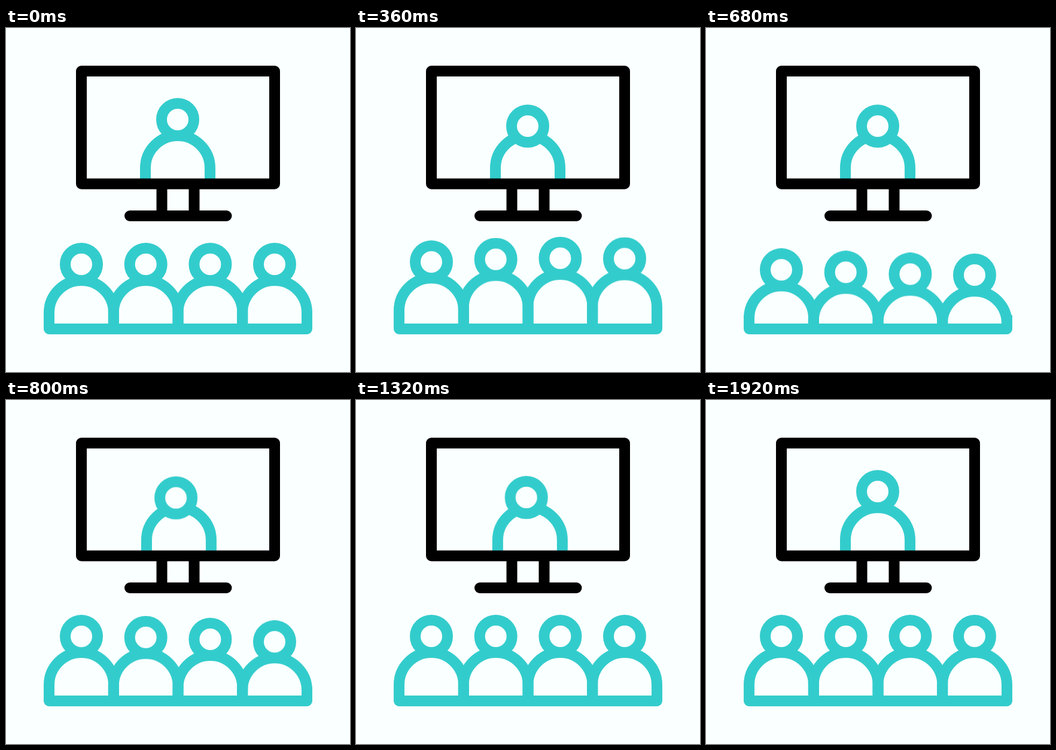
These frames come from a looping animation (575x575 px, 2 s). An HTML page:

```html
<!DOCTYPE html>
<html lang="en">
<head>
<meta charset="utf-8">
<title>Online lecture</title>
<style>
  html, body { margin: 0; width: 100%; height: 100%; overflow: hidden; background: #faffff; }
  svg { display: block; width: 100vw; height: 100vh; }
  .line { fill: none; stroke-width: 18; stroke-linejoin: round; }
  .teal { stroke: #33cccc; }
  .ink { stroke: #000; }
  .face { fill: #faffff; }

  .viewer, .head, .torso { animation: 2s cubic-bezier(.37, 0, .63, 1) infinite; }
  .viewer { animation-name: bounce; animation-delay: calc(var(--i) * 40ms); }
  .head { animation-name: nod; }
  .torso { animation-name: sway; }
  .voice {
    stroke-linecap: round;
    stroke-dasharray: 32 100;
    opacity: 0;
    animation: speak 2s linear infinite;
  }
  .left { animation-delay: -470ms; }

  @keyframes bounce {
    0%, 4% { transform: translateY(0); }
    13.75% { transform: translateY(-10.2px); }
    27.5% { transform: translateY(18px); }
    40.75%, 100% { transform: translateY(0); }
  }
  @keyframes nod {
    0%, 4% { transform: translate(0, 0); }
    14%, 36% { transform: translate(0, 11px); }
    48%, 61.5% { transform: translate(-11.5px, 9.3px); }
    71.5%, 86% { transform: translate(10px, 10.7px); }
    96%, 100% { transform: translate(0, 0); }
  }
  @keyframes sway {
    0%, 36% { transform: translateX(0); }
    48%, 61.5% { transform: translateX(7.5px); }
    71.5%, 86% { transform: translateX(-1px); }
    96%, 100% { transform: translateX(0); }
  }
  /* each stroke grows outward, then trims away from its inner end */
  @keyframes speak {
    0%, 73.99% { opacity: 0; stroke-dashoffset: 32; }
    74% { opacity: 1; stroke-dashoffset: 32; }
    80% { opacity: 1; stroke-dashoffset: 0; }
    85.9% { opacity: 1; stroke-dashoffset: -31.5; }
    85.91%, 100% { opacity: 0; stroke-dashoffset: -31.5; }
  }
</style>
</head>
<body>
<svg viewBox="0 0 575 575">
  <defs>
    <clipPath id="seats"><rect width="575" height="503"/></clipPath>
    <g id="person">
      <circle cy="395" r="27"/>
      <path d="M-54 540V476A54 54 0 0 1 54 476V540"/>
    </g>
  </defs>

  <g class="line teal">
    <path class="torso" d="M233 260V234A54 54 0 0 1 341 234V260"/>
    <circle class="head face" cx="287" cy="153" r="27"/>
  </g>

  <g class="line ink">
    <path class="voice left" d="M226.5 182L194.5 178"/>
    <path class="voice left" d="M242.5 205L232.5 235.5"/>
    <path class="voice" d="M346 185L378 184"/>
    <path class="voice" d="M329.5 207L338 238"/>
    <rect x="126" y="72" width="323" height="188.5"/>
    <path d="M260.5 260V314M314.5 260V314"/>
    <path d="M207 314H368.5" stroke-linecap="round"/>
  </g>

  <g class="line teal">
    <g clip-path="url(#seats)">
      <g class="viewer" style="--i:0"><use href="#person" x="126"/></g>
      <g class="viewer" style="--i:1"><use href="#person" x="233.7"/></g>
      <g class="viewer" style="--i:2"><use href="#person" x="341.4"/></g>
      <g class="viewer" style="--i:3"><use href="#person" x="449"/></g>
    </g>
    <path d="M72 480V503H503V480"/>
  </g>
</svg>
</body>
</html>
```
